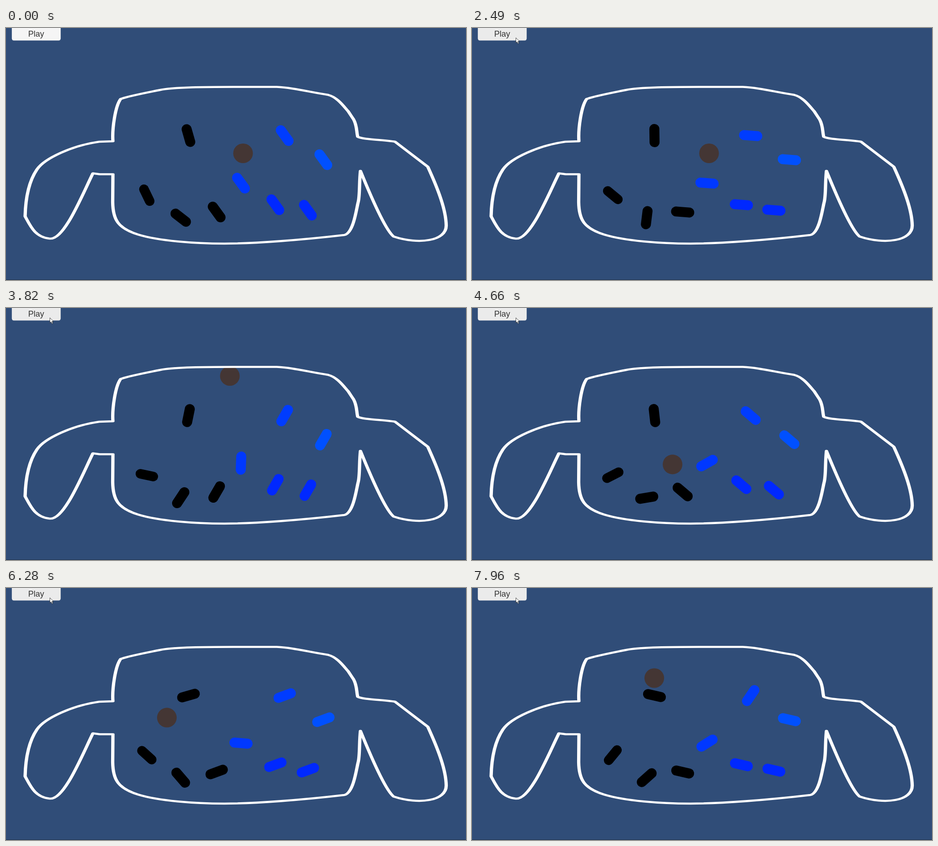
Animation of 1011 by 554 pixels, one loop 8000 ms. Source, as an HTML page:

```html
<!DOCTYPE html>
<html lang="en">
<head>
<meta charset="utf-8">
<title>Spinning bumpers</title>
<style>
  html, body { margin: 0; width: 100%; height: 100%; overflow: hidden; background: #304d78; }
  svg { display: block; width: 100vw; height: 100vh; }
  text { font: 18px "Liberation Sans", Arial, sans-serif; fill: #323232; }
  #wall { fill: none; stroke: #fff; stroke-width: 7.2; stroke-linecap: round; stroke-linejoin: round; }
  #bumpers { stroke-linecap: round; }
</style>
</head>
<body>
<svg viewBox="0 0 1011 554">
  <rect width="1011" height="554" fill="#304d78"/>
  <rect y="553" width="1011" height="1" fill="#1d304c"/>
  <rect id="button" x="12.8" y="-10" width="107.4" height="37.6" rx="4.5"/>
  <text x="66.3" y="19" text-anchor="middle">Play</text>
  <circle id="ball" r="21.6" fill="#443634"/>
  <g id="bumpers"></g>
  <path id="wall"/>
  <path id="cursor" d="M0 0V11.2L2.6 8.8L4.5 13L6.5 12.1L4.6 8H8Z" fill="#fff" stroke="#222" stroke-width=".8"/>
</svg>
<script>
const LOOP = 8000, STEP = 70, LEAD = 320, GRAVITY = 543;
const $ = id => document.getElementById(id);

// The outline is drawn with a flattened pen: thick uprights, thin horizontals.
const PEN_RATIO = 0.63;
const outline = `
  M235,249 C233,222 240,172 252,156
  C268,150 305,143 337,136.5 S440,129.5 500,129.5 H595
  C630,131 668,141 708,147 C728,152 742,172 752,183
  L764,201 C772,216 770,228 773,239
  C783,245 830,246 855,250 L927,305
  C950,355 967,400 967.5,434 S908,477 852,458.5
  C835,445 805,378 779,314
  C776,340 778,368 774,383 S764,450 744,455
  C650,466 545,474 480,474 S335,468 290,454 S235,420 234.5,383
  L235,321.5 H206 L191,319.5
  C166,370 128,466 96,463 S54,436 42,414
  C43,372 51,336 68,311 S147,258 205,250 L235,249`;
$('wall').setAttribute('d', outline.replace(/,([\d.]+)/g, (_, y) => ',' + y / PEN_RATIO));
$('wall').setAttribute('transform', `scale(1 ${PEN_RATIO})`);

// Angle in degrees after n steps: a start, a speed and its slow drift
const spin = (start, speed, drift = 0, bend = 0) => n => start + n * (speed + n * (drift + n * bend));

// A hit by the ball replaces the spin from that step on.
const hit = (before, step, speed, drift) => {
  const after = spin(before(step), speed, drift);
  return n => n < step ? before(n) : after(n - step);
};

const shared = spin(54, 26.95, 0, -0.000365);

function bumper(x, y, stroke, angle, width = 22) {
  const el = document.createElementNS('http://www.w3.org/2000/svg', 'path');
  el.setAttribute('d', 'M-14.5 0H14.5');
  el.setAttribute('stroke', stroke);
  el.setAttribute('stroke-width', width);
  $('bumpers').append(el);
  return { el, x, y, angle };
}

const bumpers = [
  bumper(401, 236.5, '#000', spin(74, 27.56, 0.0468, -0.00045)),
  bumper(309.5, 367.5, '#000', spin(64, 27.6, -0.0075), 21),
  bumper(384, 417, '#000', spin(38, 27.68, -0.1204, 0.000505)),
  bumper(463, 404.5, '#000', shared),
  bumper(612.5, 236.5, '#003cff', hit(shared, 104, 3)),
  bumper(697.5, 289.5, '#0050ff', shared),
  bumper(516.5, 341, '#0038ff', hit(shared, 42, 22.2, -0.078)),
  bumper(592, 388.5, '#0028ff', shared),
  bumper(663.5, 400.5, '#0028ff', shared)
];

// Ball contacts [ms, x, y]; free flight under gravity in between
const bounces = [
  [2915, 521, 275.5], [3200, 521, 297], [3820, 492, 149.5],
  [4755, 435, 390], [5710, 260, 181], [6500, 392, 377],
  [7545, 585, 215], [7774, 482, 154], [7960, 396, 201]
];

const clamp = v => Math.min(1, Math.max(0, v));

function ballAt(ms) {
  const next = Math.max(1, bounces.findIndex(b => b[0] >= ms));
  const [t0, x0, y0] = bounces[next - 1], [t1, x1, y1] = bounces[next];
  const p = clamp((ms - t0) / (t1 - t0)), span = (t1 - t0) / 1000;
  const lift = GRAVITY / 2 * span * span * p * (1 - p);
  return [x0 + (x1 - x0) * p, y0 + (y1 - y0) * p - lift];
}

// The pointer comes in to the button, makes one trip to the middle and returns.
function pointerAt(step) {
  const arriving = 2 * clamp((9 - step) / 5);
  const trip = clamp((9 - Math.abs(step - 20)) / 7);
  const reach = arriving + trip;
  return [96.5 + 348.5 * reach, 21.5 + 211.5 * reach];
}

function buttonColor(step) {
  if (step < 9) return '#f5f5f5';
  return step % 25 === 11 && step < 40 ? '#c8c8c8' : '#ebebeb';
}

function place(el, [x, y], angle = 0) {
  el.setAttribute('transform', `translate(${x} ${y}) rotate(${angle})`);
}

function draw(t) {
  const step = Math.max(0, 1 + Math.floor((t - LEAD) / STEP));
  const ms = LEAD + (step - 1) * STEP;
  for (const b of bumpers) place(b.el, [b.x, b.y], b.angle(step));
  place($('ball'), ballAt(ms));
  place($('cursor'), pointerAt(step));
  $('cursor').setAttribute('visibility', step < 4 ? 'hidden' : 'visible');
  $('button').setAttribute('fill', buttonColor(step));
}

const start = performance.now();
function tick() {
  draw((performance.now() - start) % LOOP);
  requestAnimationFrame(tick);
}
tick();
</script>
</body>
</html>
```
